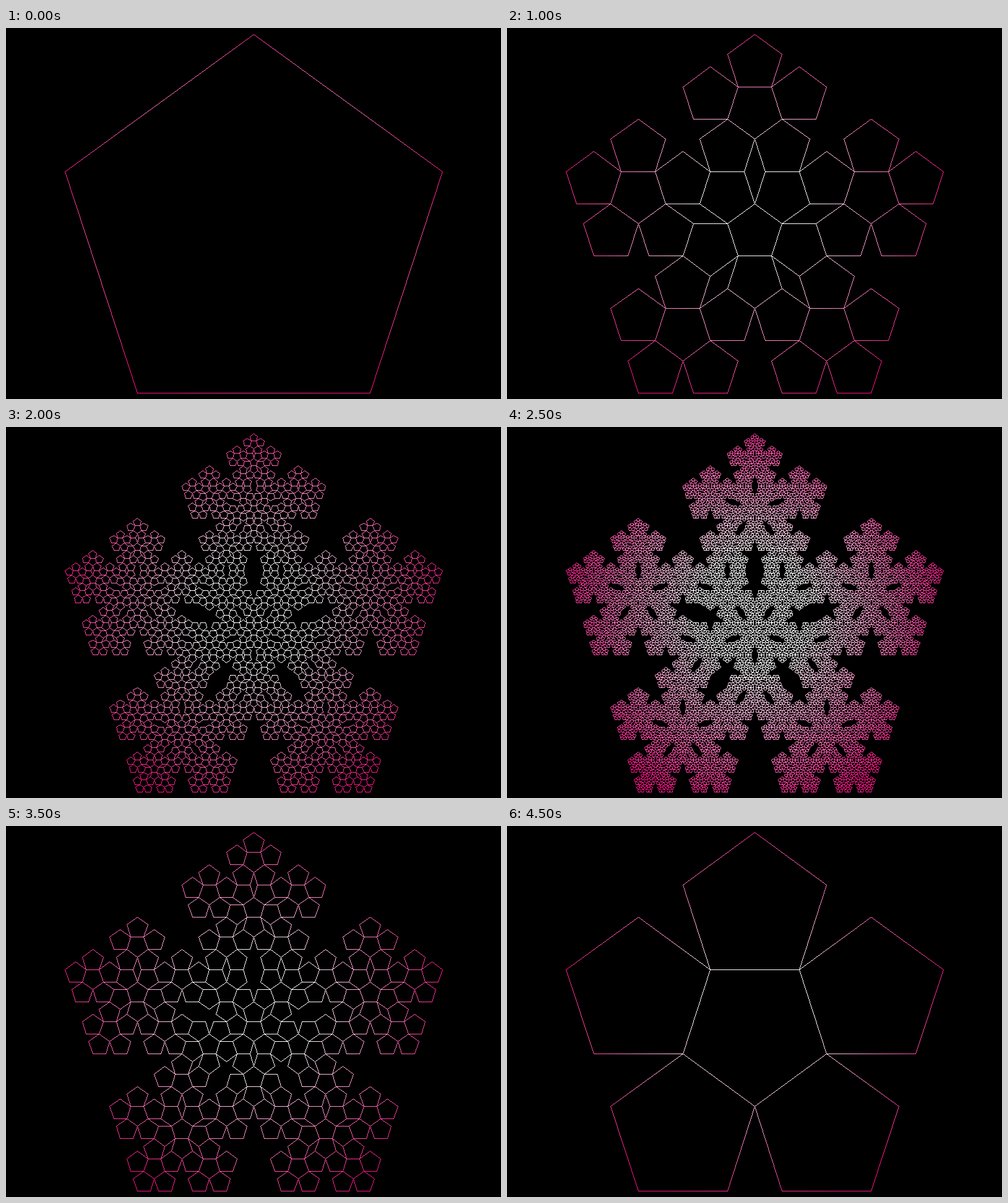
An HTML page with a canvas for the animation above (5 s loop, 800x600 px).

```html
<!DOCTYPE html>
<html lang="en">
<head>
<meta charset="utf-8">
<title>Pentagon fractal</title>
<style>
  html, body { margin: 0; width: 100%; height: 100%; overflow: hidden; background: #000; }
  canvas { display: block; }
</style>
</head>
<body>
<canvas id="stage" width="800" height="600"></canvas>
<script>
const WIDTH = 800, HEIGHT = 600;
const STEP_MS = 500, MAX_DEPTH = 5;
const RADIUS = 580 / (1 + Math.cos(Math.PI / 5));
const SHRINK = (3 - Math.sqrt(5)) / 2;
const corners = Array.from({ length: 5 }, (_, i) => {
  const angle = i * 2 * Math.PI / 5;
  return [Math.sin(angle), -Math.cos(angle)];
});

// One-pixel line without antialiasing.
function drawLine(ctx, [x0, y0], [x1, y1]) {
  const steps = Math.max(Math.abs(x1 - x0), Math.abs(y1 - y0), 1);
  for (let i = 0; i <= steps; i++) {
    const t = i / steps;
    ctx.fillRect(Math.round(x0 + (x1 - x0) * t), Math.round(y0 + (y1 - y0) * t), 1, 1);
  }
}

// A negative radius turns the pentagon upside down.
function drawFlake(ctx, x, y, radius, depth) {
  if (depth === 0) {
    const points = corners.map(([dx, dy]) => [Math.round(x + dx * radius), Math.round(y + dy * radius)]);
    points.forEach((point, i) => drawLine(ctx, point, points[(i + 1) % 5]));
    return;
  }
  const offset = radius * (1 - SHRINK);
  for (const [dx, dy] of corners) {
    drawFlake(ctx, x + dx * offset, y + dy * offset, radius * SHRINK, depth - 1);
  }
  drawFlake(ctx, x, y, -radius * SHRINK, depth - 1);
}

function renderLevel(depth) {
  const canvas = document.createElement("canvas");
  canvas.width = WIDTH;
  canvas.height = HEIGHT;
  const ctx = canvas.getContext("2d");
  ctx.fillStyle = "#000";
  ctx.fillRect(0, 0, WIDTH, HEIGHT);
  const glow = ctx.createRadialGradient(400, 300, 90, 400, 300, 320);
  glow.addColorStop(0, "#fff");
  glow.addColorStop(1, "#ff1488");
  ctx.fillStyle = glow;
  drawFlake(ctx, WIDTH / 2, 10 + RADIUS, RADIUS, depth);
  return canvas;
}

const levels = Array.from({ length: MAX_DEPTH + 1 }, (_, depth) => renderLevel(depth));
const stage = document.getElementById("stage").getContext("2d");
const start = performance.now();

function frame() {
  const elapsed = performance.now() - start;
  const step = Math.floor(elapsed / STEP_MS) % (2 * MAX_DEPTH);
  stage.drawImage(levels[Math.min(step, 2 * MAX_DEPTH - step)], 0, 0);
  requestAnimationFrame(frame);
}
frame();
</script>
</body>
</html>
```
